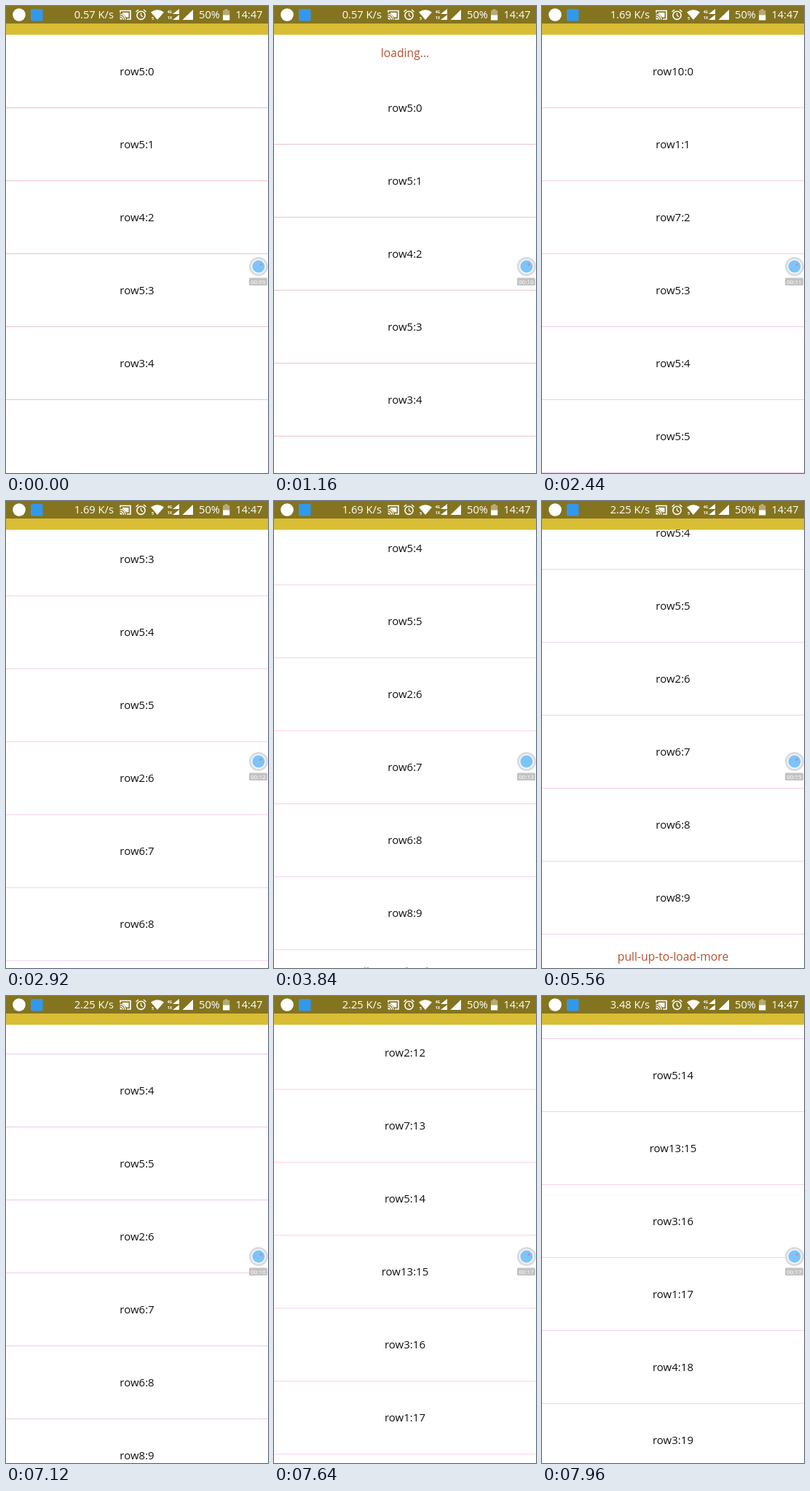
Animation of 360 by 640 pixels, one loop 8 s. Source, as an HTML page with a canvas:

```html
<!DOCTYPE html>
<html lang="en">
<head>
<meta charset="utf-8">
<title>Pull to refresh list</title>
<style>
html, body { margin: 0; width: 100%; height: 100%; overflow: hidden; background: #fff; }
canvas { display: block; width: 360px; height: 640px; }
</style>
</head>
<body>
<canvas id="stage"></canvas>
<script>
const W = 360, H = 640, TOP = 40, ROW = 100, LOOP = 8000;
const FONT = '"Open Sans", "Noto Sans", sans-serif';
const canvas = document.getElementById('stage');
const ctx = canvas.getContext('2d');
const dpr = window.devicePixelRatio || 1;
canvas.width = W * dpr;
canvas.height = H * dpr;

const firstList = [5, 5, 4, 5, 3];
const secondList = [10, 1, 7, 5, 5, 5, 2, 6, 6, 8, 4, 9, 2, 7, 5, 13, 3, 1, 4, 3];
const REFRESHED = 1760, APPENDED = 5720;

const linear = p => p;
const easeOut = p => 1 - (1 - p) ** 2.4;
const easeIn = p => p * p;
const smooth = p => p * p * (3 - 2 * p);

// Scroll offset: time, value, easing into that value.
const scrollTrack = [
  [0, 0], [40, 0, linear], [500, -92, smooth], [600, -92, linear], [820, -50, smooth],
  [1760, -50, linear], [2000, 0, smooth],
  [2520, 0, linear], [2680, 90, easeIn], [3280, 400, easeOut],
  [3760, 400, linear], [3840, 424.5, linear], [4360, 452, easeOut],
  [4680, 452, linear], [4760, 450, smooth],
  [5520, 450, linear], [5560, 446, linear], [5740, 400, linear], [6040, 360, easeOut],
  [7130, 360, linear], [7320, 480, easeIn], [7960, 1381, easeOut], [8000, 1384, linear]
];

function sample(track, t) {
  for (let i = 1; i < track.length; i++) {
    const [t1, v1, ease] = track[i], [t0, v0] = track[i - 1];
    if (t <= t1) return v0 + (v1 - v0) * ease((t - t0) / (t1 - t0));
  }
  return track[track.length - 1][1];
}

// Last entry whose start time has passed.
const step = (list, t) => list.filter(e => e[0] <= t).pop()[1];

const speeds = [[0, '0.57 K/s'], [1900, '1.69 K/s'], [4900, '2.25 K/s'], [7900, '3.48 K/s']];
const clock = [[0, '09'], [360, '10'], [1360, '11'], [2480, '12'], [3360, '13'],
  [4360, '14'], [5360, '15'], [6360, '16'], [7360, '17']];
const lineColors = [[0, '#e8c6ca'], [REFRESHED, '#f4cdea'], [4400, '#ebcdec'], [7160, '#f6cdec']];

function text(str, x, y, size, color, align = 'center', weight = 400) {
  ctx.font = weight + ' ' + size + 'px ' + FONT;
  ctx.textAlign = align;
  ctx.fillStyle = color;
  ctx.fillText(str, x, y);
}

function rect(x, y, w, h, color) {
  ctx.fillStyle = color;
  ctx.fillRect(x, y, w, h);
}

function roundRect(x, y, w, h, r, color) {
  ctx.fillStyle = color;
  ctx.beginPath();
  ctx.roundRect(x, y, w, h, r);
  ctx.fill();
}

function disc(x, y, r, color) {
  ctx.fillStyle = color;
  ctx.beginPath();
  ctx.arc(x, y, r, 0, Math.PI * 2);
  ctx.fill();
}

function poly(points, color) {
  ctx.fillStyle = color;
  ctx.beginPath();
  points.forEach(([x, y]) => ctx.lineTo(x, y));
  ctx.fill();
}

function stroke(points, width) {
  ctx.strokeStyle = '#fff';
  ctx.lineWidth = width;
  ctx.beginPath();
  points.forEach(([x, y]) => ctx.lineTo(x, y));
  ctx.stroke();
}

function arc(x, y, r, from, to, width) {
  ctx.strokeStyle = '#fff';
  ctx.lineWidth = width;
  ctx.beginPath();
  ctx.arc(x, y, r, from, to);
  ctx.stroke();
}

function headerLabel(t, scroll) {
  if (t >= 600) return 'loading...';
  return scroll > -50 ? 'pull-down-to-refresh' : 'release-to-refresh...';
}

function footerLabel(t, scroll) {
  if (t >= 4720 && t < 5500) return 'loading...';
  return scroll >= 450 ? 'release-to-load...' : 'pull-up-to-load-more';
}

function drawList(t) {
  const scroll = sample(scrollTrack, t);
  const rows = t < REFRESHED ? firstList : secondList.slice(0, t < APPENDED ? 10 : 20);
  const color = step(lineColors, t);
  const start = TOP - scroll;
  rows.forEach((n, i) => {
    const y = start + i * ROW;
    if (y > H || y + ROW < TOP) return;
    text('row' + n + ':' + i, 180, y + 55, 15, '#111');
    rect(0, y + 99, W, 1, color);
  });
  if (scroll < 0) text(headerLabel(t, scroll), 180, start - 20, 15.7, '#b4502f');
  if (scroll > 400 && rows.length === 10) {
    text(footerLabel(t, scroll), 180, start + rows.length * ROW + 36, 15.7, '#b4502f');
  }
}

function drawStatusBar(t) {
  const bar = '#84741f';
  rect(0, 0, W, TOP - 0.5, '#d9bd35');
  rect(0, 0, W, 24, bar);
  disc(18, 12, 8.8, '#fff');
  roundRect(34, 4, 16.5, 16.5, 2, '#3298ec');

  text(step(speeds, t), 148, 17, 14.7, '#fff', 'right', 500);

  // cast
  stroke([[157, 9], [157, 6.5], [171, 6.5], [171, 18], [166, 18]], 1.6);
  rect(160, 9, 8.5, 6.5, '#fff');
  poly([[156, 10.5], [161, 11], [165, 15], [165.5, 19], [156, 19]], bar);
  arc(156.5, 18.7, 2, -Math.PI / 2, 0, 2);
  arc(156.5, 18.7, 5, -Math.PI / 2, 0, 1.4);
  arc(156.5, 18.7, 7.6, -Math.PI / 2, 0, 1.4);

  // alarm
  arc(185.5, 12.8, 5.6, 0, Math.PI * 2, 1.6);
  stroke([[185.5, 9.5], [185.5, 13], [188, 14.7]], 1.3);
  stroke([[178.5, 8], [182, 5]], 1.6);
  stroke([[189, 5], [192.5, 8]], 1.6);

  // wifi
  ctx.fillStyle = '#fff';
  ctx.beginPath();
  ctx.moveTo(208, 19);
  ctx.lineTo(199, 8.5);
  ctx.quadraticCurveTo(208, 2, 217, 8.5);
  ctx.fill();
  rect(198.5, 13, 5, 7, bar);
  text('5', 201.5, 18.8, 5.5, '#fff', 'center', 700);

  // signal
  text('4G', 225, 10, 5.2, '#fff', 'center', 700);
  text('1X', 225, 18.3, 5.2, '#fff', 'center', 700);
  poly([[238, 4], [238, 11], [229, 11]], '#fff');
  poly([[238, 12], [238, 19], [229, 19]], '#fff');
  poly([[257, 5], [257, 19], [242.5, 19]], '#fff');

  text('50%', 265, 17, 14.7, '#fff', 'left', 500);

  // battery
  rect(300.5, 4.5, 4, 2, '#c0b88d');
  rect(298, 6, 9.3, 7, '#b3aa78');
  rect(298, 12.5, 9.3, 7, '#fff');

  text('14:47', 352.5, 17, 14.5, '#fff', 'right', 500);
}

function drawRecorder(t) {
  disc(347, 357, 13, '#d9dbdc');
  disc(347, 357, 10.3, '#f4f6f7');
  disc(347, 357, 8.5, '#7cc4fa');
  const dotHidden = (t + 1400) % 1600 < 480;
  if (!dotHidden) disc(350.3, 354.3, 1.7, '#c48aa8');
  roundRect(334, 372.5, 25, 10.5, 1.5, '#c3c3c3');
  text('00:' + step(clock, t), 346.5, 380.8, 8, '#fff');
}

function frame(now) {
  const t = now % LOOP;
  ctx.setTransform(dpr, 0, 0, dpr, 0, 0);
  rect(0, 0, W, H, '#fff');
  drawList(t);
  drawStatusBar(t);
  drawRecorder(t);
  requestAnimationFrame(frame);
}

requestAnimationFrame(frame);
</script>
</body>
</html>
```
